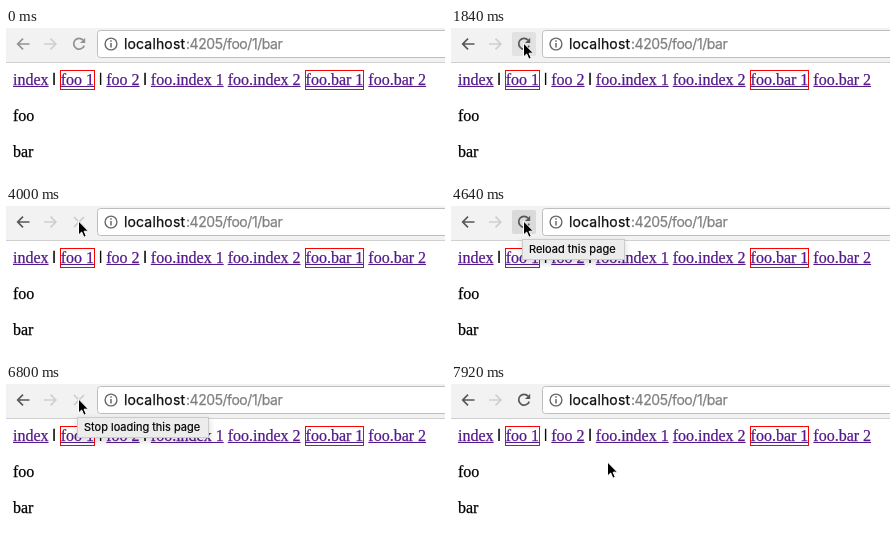
These frames come from a looping animation (439 by 150 pixels, 8000 ms). An HTML page:

```html
<!DOCTYPE html>
<html lang="en">
<head>
<meta charset="utf-8">
<title>Router reload</title>
<style>
  html, body { margin: 0; width: 100%; height: 100%; overflow: hidden; background: #fff; }
  #stage { position: relative; width: 439px; height: 150px; overflow: hidden; background: #fff; }
  svg { position: absolute; left: 0; top: 0; }
  text { fill: currentColor; stroke: currentColor; stroke-width: .25px; }
  .line {
    position: absolute; left: 7px; white-space: pre; color: #000;
    font: 16px/18px "Liberation Serif", Times, serif;
    -webkit-text-stroke: .25px;
  }
  .line a { color: #551a8b; text-decoration: underline; }
  .line a.on {
    display: inline-block; height: 18px; margin: -1px 0;
    border: 1px solid #f00;
  }
  .line i {
    display: inline-block; font-style: normal; clip-path: inset(0 0 4px);
    -webkit-text-stroke: .6px;
  }
  .sans { font-family: Inter, "Liberation Sans", sans-serif; }
  #tip {
    position: absolute; left: 71px; top: 33px; height: 19px; padding: 0 8px 0 6px;
    font-size: 11px; line-height: 19px; white-space: pre; color: #000;
    -webkit-text-stroke: .2px;
    background: #ececec; border: 1px solid #cbcbcb;
    box-shadow: 0 3px 6px 1px rgba(0, 0, 0, .13);
  }
</style>
</head>
<body>
<div id="stage">
  <svg width="439" height="150" fill="none">
    <path d="M0 0H439V34H0Z" fill="#f2f2f2"/>
    <path d="M0 34.5H439" stroke="#d0d0d0"/>
    <rect x="91.5" y="2.5" width="360" height="27" rx="3" fill="#fff" stroke="#bebebe"/>
    <rect id="hover" x="61" y="4" width="24" height="24" rx="2" fill="#dadada"/>
    <path id="back" d="M23.5 16H12.2M17 10.7L11.7 16L17 21.3" stroke-width="1.7"/>
    <path d="M38 16H49.3M44.5 10.7L49.8 16L44.5 21.3" stroke="#cfcfcf" stroke-width="1.7"/>
    <g id="reload">
      <path d="M77.2 12.2A5.4 5.4 0 1 0 78.2 17.6" fill="none" stroke-width="1.7"/>
      <path d="M79.2 9.8V15H74Z" stroke="none"/>
    </g>
    <path id="stop" d="M68 11L78 21M78 11L68 21" stroke-width="1.7"/>
    <circle cx="105" cy="16" r="5.9" stroke="#686868" stroke-width="1.4"/>
    <path d="M105 12.3V13.8M105 15V19.6" stroke="#686868" stroke-width="1.5"/>
    <g class="sans" font-size="14">
      <text x="118" y="21" color="#111" letter-spacing=".15">localhost</text>
      <text x="180" y="21" color="#808080" letter-spacing="-.45">:4205/foo/1/bar</text>
    </g>
  </svg>

  <div id="links" class="line" style="top:43px"></div>
  <div id="first" class="line" style="top:79px"></div>
  <div id="second" class="line" style="top:115px">bar</div>
  <div id="tip" class="sans"></div>

  <svg width="439" height="150">
    <g id="cursor" stroke-linejoin="round">
      <path id="arrow" d="M0 0V14L3.2 11L5.4 16.2L7.8 15.2L5.6 10.2H10Z" fill="#000" stroke="#fff" stroke-width="1"/>
      <path id="hand" transform="translate(-5 0)" fill="#fff" stroke="#000" stroke-width="1.1"
        d="M4 9.5V1.5C4 .2 6.3 .2 6.3 1.5V6C6.6 5 8.6 5.2 8.6 6.4C9 5.6 10.8 5.9 10.8 7.1C11.2 6.5 12.8 6.8 12.8 8V11C12.8 13 11.5 13.5 11.5 16H5.5C5.5 14 3.5 13 1 9.6C.2 8.4 1.5 7.3 2.6 8.2ZM7.2 10.5V13.5M9.3 10.5V13.5"/>
      <g id="beam" fill="none">
        <path d="M-3 -7Q0 -7 0 -5Q0 -7 3 -7M0 -5V5M-3 7Q0 7 0 5Q0 7 3 7M-1.8 2.5H1.8" stroke="#fff" stroke-width="2.6"/>
        <path d="M-3 -7Q0 -7 0 -5Q0 -7 3 -7M0 -5V5M-3 7Q0 7 0 5Q0 7 3 7M-1.8 2.5H1.8" stroke="#111" stroke-width="1.2"/>
      </g>
    </g>
  </svg>
</div>
<script>
const LOOP = 8000, STEP = 80;
const $ = id => document.getElementById(id);

// Each table holds [start time, value...]
const PAGE = [[0, 'app'], [2640, 'blank'], [3040, 'loading'], [4000, 'app'],
  [5520, 'blank'], [6080, 'loading'], [6720, 'app']];
const BUTTON = [[0, 'reload'], [2560, 'stop'], [3040, 'off'], [4400, 'reload'],
  [5520, 'stop'], [6080, 'off'], [7040, 'reload']];
const TIP = [[0, ''], [4640, 'Reload this page'], [5440, ''],
  [5760, 'Stop loading this page'], [7520, '']];
const SHAPE = [[0, 'none'], [80, 'arrow'], [640, 'hand'], [1600, 'arrow'],
  [7120, 'beam'], [7760, 'arrow']];
const HOVER = [[0, 0], [1680, 0], [1920, 1], [3039, 1], [3040, 0], [4399, 0],
  [4400, 1], [6079, 1], [6080, 0]];
const FADE = [[0, 1], [7040, 1], [7120, .8], [7440, .1], [7520, 0]];
const PATH = [[80, 270, 138], [160, 182, 98], [240, 97, 64], [560, 97, 64],
  [880, 91, 54], [1120, 89, 51], [1440, 89, 52], [1520, 87, 47],
  [1680, 77, 24], [1840, 72.5, 15], [6960, 72.5, 15], [7040, 95, 15],
  [7200, 160, 17], [7600, 160, 17], [7680, 159, 27], [7760, 158, 50],
  [7840, 157, 70], [7920, 156.5, 78]];

const held = (table, t) => table.filter(row => row[0] <= t).pop()[1];

function glide(table, t, col = 1) {
  const i = table.findIndex(row => row[0] > t);
  if (i < 0) return table[table.length - 1][col];
  if (i === 0) return table[0][col];
  const a = table[i - 1], b = table[i];
  return a[col] + (b[col] - a[col]) * (t - a[0]) / (b[0] - a[0]);
}

const show = (id, on) => { $(id).style.display = on ? '' : 'none'; };

function linkBar(loading) {
  const link = (name, on) => `<a${on ? ' class="on"' : ''}>${name}</a>`;
  const bar = ' <i>|</i> ';
  return link('index') + bar + link('foo 1', true) + bar + link('foo 2', loading) + bar +
    [link('foo.index 1'), link('foo.index 2'), link('foo.bar 1', true), link('foo.bar 2', loading)].join(' ');
}

let lastPage;
function drawPage(page) {
  if (page === lastPage) return;
  lastPage = page;
  const loading = page === 'loading';
  $('links').innerHTML = page === 'blank' ? '' : linkBar(loading);
  $('first').textContent = { app: 'foo', loading: 'Loading application', blank: '' }[page];
  show('second', page === 'app');
}

function draw(time) {
  const t = Math.floor(time % LOOP / STEP) * STEP;
  drawPage(held(PAGE, t));

  const button = held(BUTTON, t), ink = t < STEP ? '#929292' : '#585858';
  show('reload', button === 'reload');
  show('stop', button !== 'reload');
  $('back').setAttribute('stroke', ink);
  $('reload').setAttribute('stroke', ink);
  $('reload').setAttribute('fill', ink);
  $('stop').setAttribute('stroke', button === 'off' ? '#cdcdcd' : ink);
  $('hover').setAttribute('opacity', glide(HOVER, t));

  const tip = held(TIP, t);
  show('tip', tip);
  $('tip').textContent = tip;
  $('tip').style.opacity = glide(FADE, t);

  const shape = held(SHAPE, t);
  for (const id of ['arrow', 'hand', 'beam']) show(id, id === shape);
  $('cursor').setAttribute('transform', `translate(${glide(PATH, t)} ${glide(PATH, t, 2)})`);
}

const start = performance.now();
function tick() {
  draw(performance.now() - start);
  requestAnimationFrame(tick);
}
tick();
</script>
</body>
</html>
```
